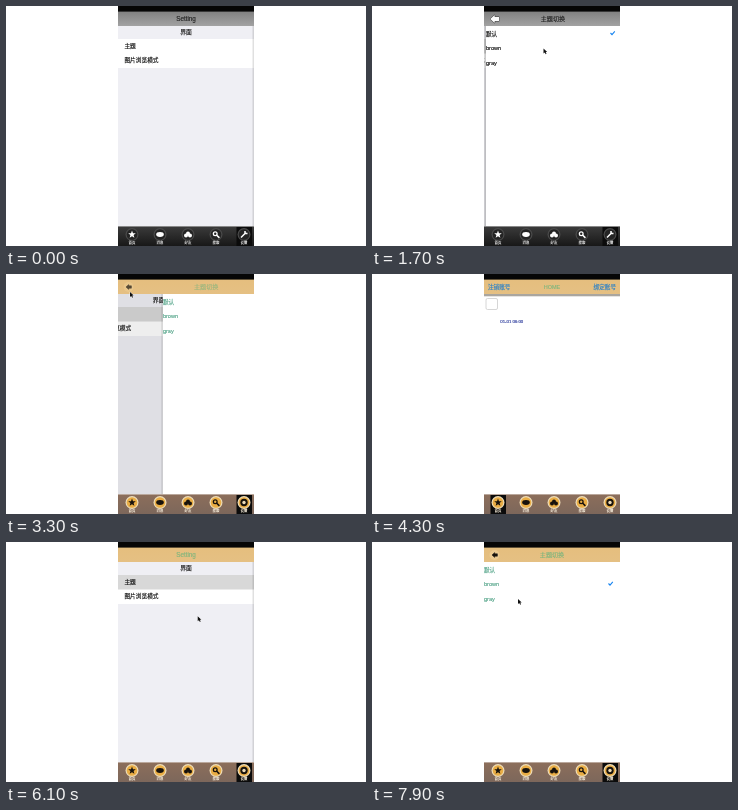
Animation of 360 by 240 pixels, one loop 8000 ms. Source, as an HTML page with a canvas:

```html
<!DOCTYPE html>
<html lang="zh">
<head>
<meta charset="utf-8">
<style>
html, body { margin: 0; width: 100%; height: 100%; overflow: hidden; background: #fff; }
canvas { display: block; }
</style>
</head>
<body>
<canvas id="stage" width="360" height="240"></canvas>
<script>
const c = document.getElementById('stage').getContext('2d');
const L = 112, W = 136, MID = L + W / 2, ROW = 14.5;
const LOOP = 8000, STEP = 100, SLIDE = 400;
const FONT = '"Liberation Sans", "Noto Sans CJK SC", "Noto Sans CJK", sans-serif';
const TABS = ['首页', '消息', '好友', '搜索', '设置'];
const THEMES = {
  dark: { nav: ['#818181', '#a2a2a2'], bar: ['#3b3b3b', '#171717'], title: '#222', text: '#111',
          rim: '#4a4a4a', disc: '#242424', glyph: '#fff', label: '#ddd' },
  brown: { nav: ['#e5be7e', '#e5c083'], bar: ['#8c6e5b', '#7c675b'], title: '#7fb57d', text: '#55a58a',
           rim: '#eddcb8', disc: '#e9ad45', glyph: '#17120c', label: '#f4ead8' }
};

const tabX = i => 126 + i * 28;
const tabTip = i => ({ x: tabX(i), y: 228 });
const MOVES = [
  { from: 200, to: 1300, x: 171.5, y: 42.5 },
  { from: 2600, to: 3250, x: 124, y: 18 },
  { from: 3500, to: 4000, ...tabTip(0) },
  { from: 4600, to: 5300, ...tabTip(4) },
  { from: 5600, to: 6280, x: 182, y: 42 },
  { from: 6900, to: 7900, x: 146, y: 57 }
];

const clamp = v => Math.max(0, Math.min(1, v));
const easeOut = v => 1 - (1 - clamp(v)) ** 3;
const easeInOut = v => clamp(v) ** 2 * (3 - 2 * clamp(v));
const slide = (t, start) => easeOut((t - start) / SLIDE);

function rect(x, y, w, h, fill) { c.fillStyle = fill; c.fillRect(x, y, w, h); }

function shade(y, h, [a, b]) {
  const g = c.createLinearGradient(0, y, 0, y + h);
  g.addColorStop(0, a);
  g.addColorStop(1, b);
  rect(L, y, W, h, g);
}

function text(s, x, y, size, color, align = 'left') {
  c.font = `${size}px ${FONT}`;
  c.textAlign = align;
  c.textBaseline = 'middle';
  c.fillStyle = c.strokeStyle = color;
  c.lineWidth = .15;
  c.fillText(s, x, y);
  c.strokeText(s, x, y);
}

function ellipse(x, y, rx, ry, fill) {
  c.fillStyle = fill;
  c.beginPath();
  c.ellipse(x, y, rx, ry, 0, 0, 7);
  c.fill();
}

const disc = (x, y, r, fill) => ellipse(x, y, r, r, fill);

function shape(path, fill, line, width) {
  const p = new Path2D(path);
  if (line) {
    c.strokeStyle = line;
    c.lineWidth = width;
    c.stroke(p);
  }
  if (fill) {
    c.fillStyle = fill;
    c.fill(p);
  }
}

function at(x, y, paint, alpha = 1) {
  c.save();
  c.translate(x, y);
  c.globalAlpha *= alpha;
  paint();
  c.restore();
}

function star(r, fill) {
  c.beginPath();
  for (let k = 0; k < 10; k++) {
    const a = k * Math.PI / 5, d = k % 2 ? r * .42 : r;
    c.lineTo(d * Math.sin(a), -d * Math.cos(a));
  }
  c.fillStyle = fill;
  c.fill();
}

const GLYPHS = [
  th => star(4, th.glyph),
  th => ellipse(0, 0, 3.8, 2.4, th.glyph),
  th => { for (let k = -1; k < 2; k++) disc(k * 2, 1 - (k === 0) * 2, 2, th.glyph); },
  th => {
    shape('M0 0L3.4 3.4', null, th.glyph, 1.5);
    disc(-.8, -.8, 2.5, th.glyph);
    disc(-.8, -.8, 1.2, th.disc);
  },
  th => {
    if (th === THEMES.dark) shape('M-3 3L2 -2M1 -3.5V-1H3.5', null, th.glyph, 1.5);
    else {
      disc(0, 0, 3.7, th.glyph);
      disc(0, 0, 1.7, th.rim);
    }
  }
];

function tabBar(th, selected) {
  shade(220.4, 20, th.bar);
  TABS.forEach((name, i) => {
    const x = tabX(i);
    if (i === selected) rect(x - 7.5, 221, 15.5, 19, '#0b0b0b');
    at(x, 228.5, () => {
      disc(0, 0, 6.5, th.rim);
      disc(0, 0, 5.3, th.disc);
      GLYPHS[i](th);
    });
    text(name, x, 237, 3.4, th.label, 'center');
  });
}

function backButton(th) {
  const dark = th === THEMES.dark, size = dark ? 1 : .6;
  if (!dark) disc(122.5, 13, 5, '#eccb91');
  at(122.7, 13, () => {
    c.scale(size, size);
    shape('M-4.5 0L0 -4V-2H4.5V2H0V4Z', th.glyph, '#333', 1);
  });
}

function settings(pressed) {
  rect(L, 20, W, 200, '#efeff4');
  text('界面', MID, 26.3, 5.8, '#111', 'center');
  rect(L, 33, W, ROW * 2, '#fff');
  if (pressed) rect(L, 33, W, ROW, '#d8d8d8');
  ['主题', '图片浏览模式'].forEach((s, i) => text(s, 118.4, 40.2 + i * ROW, 5.7, '#111'));
}

function themeList(th, pressed, checked) {
  rect(L, 20, W, 200, '#fff');
  if (pressed) rect(L, 34.5, W, ROW, '#d8d8d8');
  ['默认', 'brown', 'gray'].forEach((s, i) => text(s, L, 28.2 + i * ROW, 5.6, th.text));
  at(238.5, 27 + checked * ROW, () => shape('M-2 0L-.5 1.6L2.3 -1.6', null, '#1583f0', 1.1));
}

function home() {
  rect(L, 20, W, 200, '#fff');
  rect(L, 20, W, 2.3, '#aaa69f');
  c.beginPath();
  c.roundRect(114, 24.5, 11.5, 11, 1.5);
  c.strokeStyle = '#ccc';
  c.lineWidth = .8;
  c.stroke();
  text('01-01 08:00', 128.3, 48, 4.3, '#2b3b9c');
}

function cursor(t) {
  let { x, y } = tabTip(4);
  for (const m of MOVES) {
    const k = easeInOut((t - m.from) / (m.to - m.from));
    x += (m.x - x) * k;
    y += (m.y - y) * k;
  }
  // The pointer is lost against the icons while it rests on the tab bar
  if (y < 226) at(x, y, () => shape('M0 0V5L1.2 4L2.2 5.8L3 5.3L2.2 3.6H3.7Z', '#111', 'rgba(255,255,255,.8)', .8));
}

function draw(t) {
  const th = t < 2600 ? THEMES.dark : THEMES.brown;
  const atHome = t >= 4100 && t < 5500;
  // 0 = settings page on top, 1 = theme list fully in place
  const pushed = slide(t, 1398) - slide(t, 3250) + slide(t, 6550);
  const off = W * (1 - pushed);

  rect(0, 0, 360, 240, '#fff');
  c.save();
  c.beginPath();
  c.rect(L, 0, W, 240);
  c.clip();

  if (atHome) home();
  else {
    at(-.3 * W * pushed, 0, () => settings(t >= 1300));
    rect(L, 20, W, 200, `rgba(0,0,0,${.1 * pushed})`);
    at(off, 0, () => {
      rect(L - 1.5, 20, 1.5, 200, 'rgba(0,0,0,.12)');
      themeList(th, t >= 2300 && t < 2600, th === THEMES.brown);
    });
  }

  rect(L, 0, W, 6, '#060606');
  shade(5.6, 14.4, th.nav);
  if (atHome) {
    text('注销账号', 116, 13, 5.6, '#2a80c8');
    text('HOME', MID, 13, 5.5, th.title, 'center');
    text('绑定账号', 244, 13, 5.6, '#2a80c8', 'right');
  } else {
    at(-40 * pushed, 0, () => text('Setting', MID, 13, 6.3, th.title, 'center'), clamp(1 - 2 * pushed));
    at(off * .45, 0, () => text('主题切换', MID, 13, 6.1, th.title, 'center'), pushed);
    at(0, 0, () => backButton(th), pushed);
  }
  tabBar(th, atHome ? 0 : 4);
  cursor(t);
  c.restore();
}

function tick() {
  draw(Math.floor(performance.now() % LOOP / STEP) * STEP);
  requestAnimationFrame(tick);
}
tick();
</script>
</body>
</html>
```
